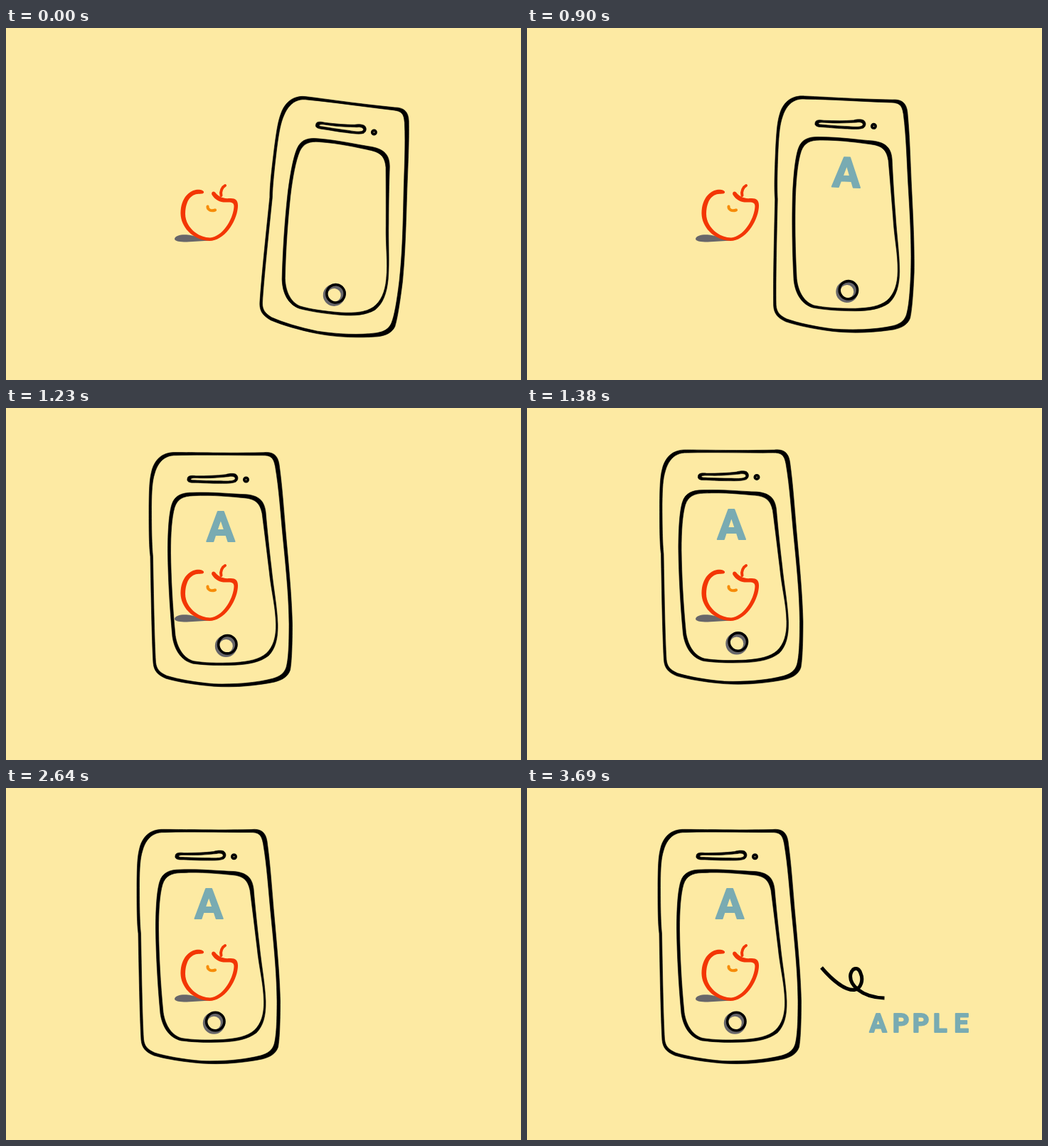
Animation, 724 px wide and 496 px high, one loop 5340 ms. Source, as an HTML page:

```html
<!DOCTYPE html>
<html lang="en">
<head>
<meta charset="utf-8">
<title>A is for apple</title>
<style>
  html, body { margin: 0; width: 100%; height: 100%; overflow: hidden; background: #fdeaa3; }
  svg { display: block; width: 724px; height: 496px; }
  .line { fill: none; stroke: #000; }
  .ink { fill-rule: evenodd; stroke: #000; stroke-width: .6; }
  text {
    font: 700 59px Roboto, Arial, sans-serif;
    fill: #79abb2; stroke: #79abb2; stroke-width: 2; stroke-linejoin: round;
  }
  #word { font-size: 36px; }
</style>
</head>
<body>
<svg viewBox="0 0 724 496">
  <g id="apple">
    <path fill="#67666a" d="M237 297C238 291 252 290 262 292.500C270 294 278 297 287 299.500C275 300 262 301.500 250 301.500C242 301 237 300 237 297Z"/>
    <path fill="#f33605" d="M278 232C279 229 273 227 267 228C252 231 245 247 245.5 262C246 280 262 299 286 300C308 300 326 270 326 250C326 242 322 239.5 314 240C304 241 297 236 294 231.5C291 229 288 232 289.5 235C294 243 302 246 310 245.5C317 245 320.5 246 320.5 251C320 268 305 294 287 295.500C268 295 252 279 252 262C252 248 257 238 265 235C270 232.5 276 235 278 232Z"/>
    <g fill="none" stroke-width="4" stroke-linecap="round">
      <path stroke="#f33605" d="M308 222C304 224 301 230 302.500 236"/>
      <path stroke="#f68b08" d="M283.5 251.5C283 256 288 258.5 294 256.5"/>
    </g>
  </g>

  <g id="phone">
    <path class="ink" d="M184 135C184.3 112 184.5 98 187.5 86C190 74 197 64.5 206 61C212 58.5 216 58.3 222 58.3C260 58.5 290 59.5 345 58.5C358 57 365 62 367 75C371 105 372 120 377 180C382 235 384.5 265 385.5 300C385.5 330 384.5 355 382.5 365C379.5 374 372 379 360 382C335 387 305 390 275 388C250 386 225 382 208 377C196 372 191 366 190 355C188 320 187 260 186 205C184 190 184 165 184 135Z
      M187.5 135C187.8 112 188.5 99 192 88C195 77 201 68.5 209 65C213 63 217 62.5 223 62.5C260 61.5 300 62.8 343 62.5C355 62.5 359 65 361.5 78C367 110 369 145 373 185C378 235 380.5 265 381 300C381 330 380 350 377 361C374 370 368 374 358 377C335 383 305 385.5 275 384.5C250 382.5 225 378 209 373C198 368 194.5 363 193.5 354C191.5 320 190.5 260 189.5 205C188 190 187.5 165 187.5 135Z"/>
    <path class="ink" d="M210.5 200C210.5 170 212 145 216 132C220 119 230 115 245 115C275 114 300 117 320 117.5C338 119 346 126 348 142C350 165 353 195 356 220C359 250 364 275 365 300C365.5 320 362 335 352 345C340 354 325 357 305 358C280 359 262 358 246 356C230 352 220 338 217 318C213 275 211 235 210.5 200Z
      M214.5 200C214.5 172 216 150 220 136C224 124 232 120 246 119.5C275 118 300 121 318 122.5C334 124 340 130 343 144C347 175 350 200 353 225C356 255 362 275 362.5 300C363 318 359 332 349 341.5C339 350 325 353 305 354.5C280 355.5 262 355 247 352.5C234 349 224 336 221 316C217 275 215 235 214.5 200Z"/>
    <path class="ink" d="M238 95.5C238 91.500 243 90.500 250 91.500C265 91.500 280 91 292 89.500C296 88 303 87.500 306 89C310 92 310 97 306 100C300 102.500 290 102 280 102C265 102 255 101 246 101C240 101 237 99 238 95.5Z
      M243 95.5C245 94 250 94.500 255 94.500C270 95 285 93.500 296 92.500C302 91 306 93 305 96C303 99 295 99 285 98.500C270 98.500 258 98 248 97.500C244 97.500 242 97 243 95.5Z"/>
    <circle class="line" cx="320.5" cy="96.800" r="2.600" stroke-width="3.800"/>
    <g id="button">
      <circle fill="none" stroke="#67666a" stroke-width="6" cx="292.3" cy="331.3" r="12.500"/>
      <circle class="line" stroke-width="3.600" cx="294.3" cy="329" r="12.700"/>
    </g>
    <text id="letter" x="285" y="184.300" text-anchor="middle">A</text>
  </g>

  <path id="rays" class="line" stroke-width="4" stroke-linecap="round" d="M386 62L424 32M404 86L479 80M400 112L432 140"/>
  <path id="squiggle" class="line" stroke-width="5" pathLength="1" d="M414 253C426 267 445 285 460 284.5C470 283 473 270 469 261C466 252 458 252.500 455 262C452 277 470 295 502.500 296"/>
  <text id="word" x="481.500 514 542 571 600.500" y="344">APPLE</text>
</svg>
<script>
const LOOP = 5340;
const el = id => document.getElementById(id);
const [phone, button, letter, rays, squiggle, word] =
  ['phone', 'button', 'letter', 'rays', 'squiggle', 'word'].map(el);

const span = (t, from, to) => Math.min(1, Math.max(0, (t - from) / (to - from)));
const pulse = u => Math.sin(Math.PI * u) ** 2;
const scaleAt = (x, y, s) => `translate(${x} ${y}) scale(${s}) translate(${-x} ${-y})`;

// cubic-bezier(.65, 0, .24, 1), solved by bisection
function ease(u) {
  if (u <= 0 || u >= 1) return u;
  let lo = 0, hi = 1, s;
  for (let i = 0; i < 24; i++) {
    s = (lo + hi) / 2;
    const x = 3 * (1 - s) * s * ((1 - s) * .65 + s * .24) + s ** 3;
    if (x < u) lo = s; else hi = s;
  }
  return s * s * (3 - 2 * s);
}

function draw(t) {
  const away = 1 - ease(span(t, 660, 1500));
  const tilt = 6.9 * (1 - ease(span(t, 660, 1130)));
  phone.setAttribute('transform',
    `translate(${285 + 182 * away} ${223 + 45 * away}) rotate(${tilt}) translate(-285 -223)`);
  letter.setAttribute('opacity', span(t, 60, 240));

  button.setAttribute('transform', scaleAt(293, 331, 1 + .1 * pulse(span(t, 1940, 2400))));
  const size = pulse(span(t, 1940, 2640));
  rays.setAttribute('transform', scaleAt(420, 79, size));
  rays.setAttribute('visibility', size > 1e-6 ? 'visible' : 'hidden');

  const drawn = span(t, 2830, 3400);
  squiggle.setAttribute('stroke-dasharray', `${drawn} 2`);
  squiggle.setAttribute('visibility', drawn ? 'visible' : 'hidden');
  word.setAttribute('opacity', span(t, 3370, 3690));
}

const start = performance.now();
function tick() {
  draw((performance.now() - start) % LOOP);
  requestAnimationFrame(tick);
}
tick();
</script>
</body>
</html>
```
